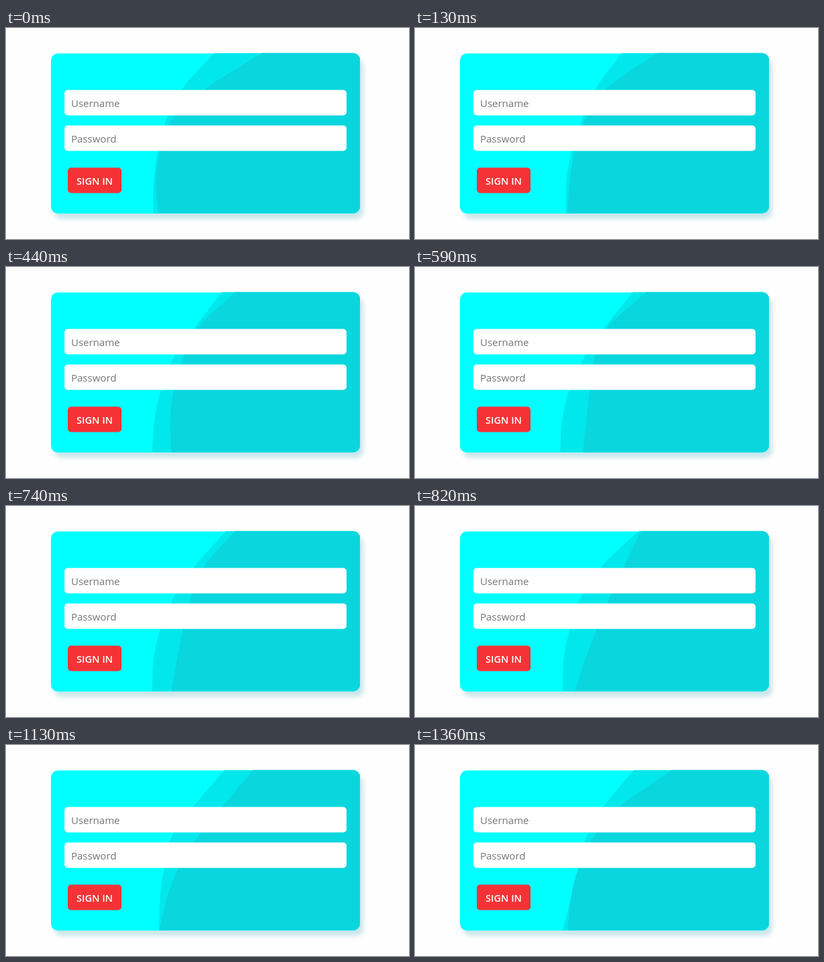
Write an HTML page that moves like this. It is 600 by 315 pixels and loops after 1440 ms.

```html
<!DOCTYPE html>
<html lang="en">
<head>
<meta charset="utf-8">
<title>Sign in</title>
<style>
  html, body { margin: 0; width: 100%; height: 100%; overflow: hidden; background: #fefefe; }
  svg { position: absolute; left: 0; top: 0; }
  .card {
    position: absolute; left: 67px; top: 37.5px; width: 460px; height: 239px;
    border-radius: 10px; background: #0ff; box-shadow: 5px 8px 6px #cbe7eb;
  }
  text { font: 15px "Open Sans", "Noto Sans", sans-serif; fill: #757575; }
  text.label { font-size: 14.5px; font-weight: 600; fill: #fff; text-anchor: middle; }
</style>
</head>
<body>
<div class="card"></div>
<svg width="600" height="315" viewBox="0 0 600 315">
  <clipPath id="clip"><rect x="67" y="37.5" width="460" height="239" rx="10"/></clipPath>
  <g clip-path="url(#clip)">
    <path id="back" fill="#00e8ec"/>
    <path id="front" fill="#0ad6de"/>
  </g>
  <rect x="87" y="92.5" width="420" height="38" rx="5" fill="#fff"/>
  <rect x="87" y="145.5" width="420" height="38" rx="5" fill="#fff"/>
  <rect x="92" y="208.5" width="80" height="38" rx="5" fill="#f53336"/>
  <text x="97" y="117.5">Username</text>
  <text x="97" y="170.5">Password</text>
  <text class="label" x="132" y="233.5">SIGN IN</text>
</svg>
<script>
  const LOOP = 1440, STEP = 1000 / 13;
  const levels = [37, 92, 138, 185, 230, 277];

  // Left outline of each turning blob at the levels above, by time.
  const poses = [
    { t: 0,    back: [310, 261, 238, 226, 220, 219], front: [382, 295, 246, 229, 223, 227] },
    { t: 130,  back: [308, 268, 248, 233, 225, 225], front: [361, 283, 253, 238, 230, 227] },
    { t: 280,  back: [318, 279, 246, 231, 223, 219], front: [338, 284, 260, 239, 234, 242] },
    { t: 590,  back: [325, 281, 250, 229, 219, 216], front: [345, 285, 267, 260, 255, 250] },
    { t: 820,  back: [333, 276, 246, 230, 221, 220], front: [336, 310, 289, 270, 253, 238] },
    { t: 1130, back: [325, 279, 246, 235, 229, 228], front: [368, 322, 285, 256, 239, 228] },
    { t: 1360, back: [326, 281, 255, 243, 232, 220], front: [383, 305, 265, 243, 232, 227] }
  ];

  function outline(name, t) {
    let i = poses.length - 1;
    while (poses[i].t > t) i--;
    const a = poses[i], b = poses[(i + 1) % poses.length];
    const k = (t - a.t) / ((b.t || LOOP) - a.t);
    return a[name].map((x, j) => x + (b[name][j] - x) * k);
  }

  // Smooth curve through the outline, closed beyond the card's right side.
  function blob(xs) {
    const last = xs.length - 1;
    const slope = i => {
      const p = Math.max(i - 1, 0), n = Math.min(i + 1, last);
      return (xs[n] - xs[p]) / (levels[n] - levels[p]);
    };
    let d = `M${xs[0]} ${levels[0]}`;
    for (let i = 0; i < last; i++) {
      const h = (levels[i + 1] - levels[i]) / 3;
      d += `C${xs[i] + slope(i) * h} ${levels[i] + h} ` +
           `${xs[i + 1] - slope(i + 1) * h} ${levels[i + 1] - h} ` +
           `${xs[i + 1]} ${levels[i + 1]}`;
    }
    return d + `H530V${levels[0]}Z`;
  }

  // The motion advances in steps of a thirteenth of a second.
  function stepped(t) {
    if (t < 70) return 0;
    return 130 + Math.floor((t - 126) / STEP) * STEP;
  }

  const paths = ["back", "front"].map(id => document.getElementById(id));
  const start = performance.now();

  function draw() {
    const t = stepped((performance.now() - start) % LOOP);
    for (const p of paths) p.setAttribute("d", blob(outline(p.id, t)));
    requestAnimationFrame(draw);
  }
  draw();
</script>
</body>
</html>
```
